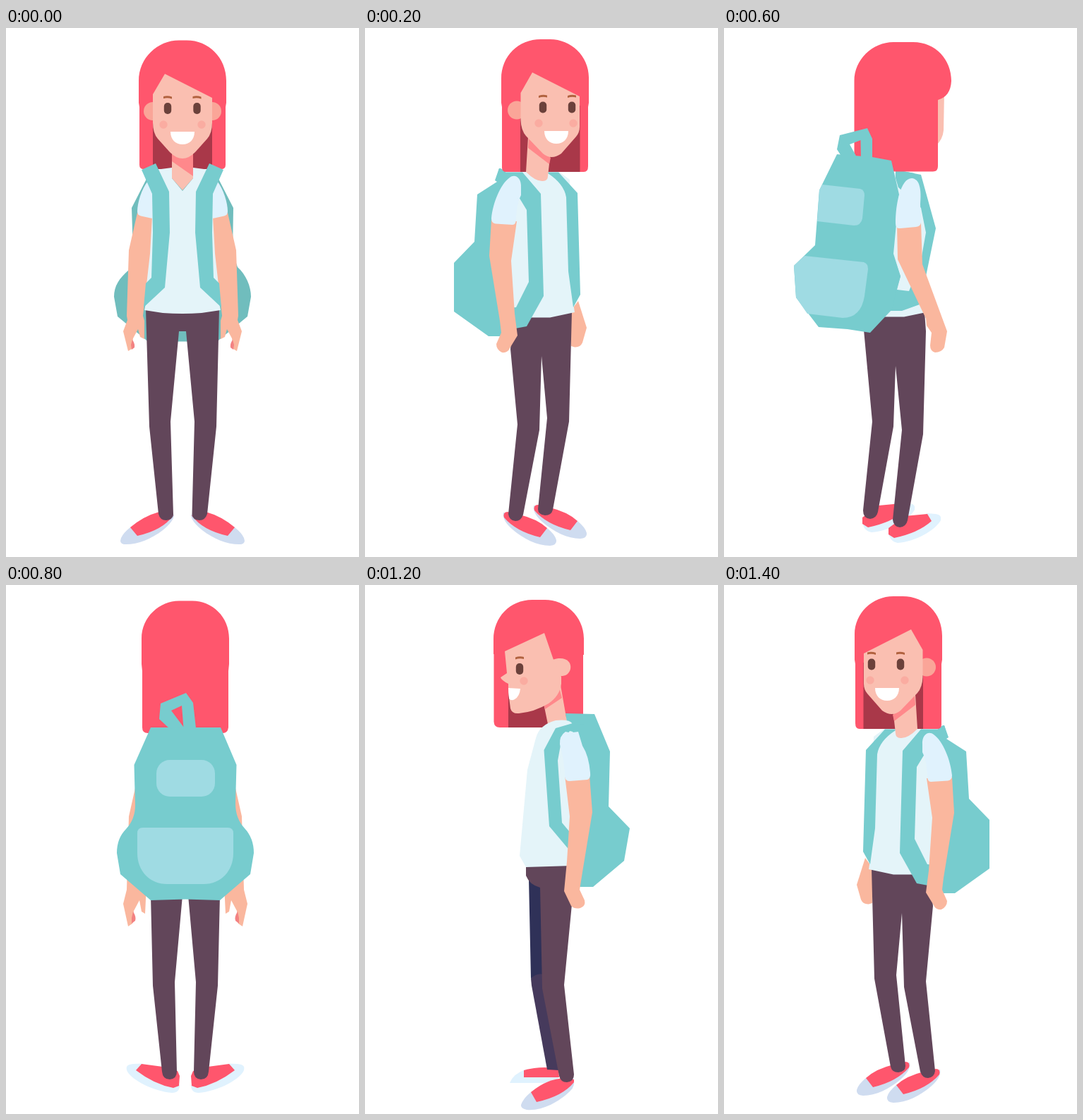
These frames come from a looping animation (500 px wide and 750 px high, 1.6 s). An HTML page with a canvas:

```html
<!DOCTYPE html>
<html lang="en">
<head>
<meta charset="utf-8">
<title>Turnaround</title>
<style>
html, body { margin: 0; width: 100%; height: 100%; overflow: hidden; background: #fff; }
canvas { display: block; }
</style>
</head>
<body>
<canvas id="stage" width="500" height="750"></canvas>
<script>
const ctx = document.getElementById('stage').getContext('2d');
const STEP = 200;

const HAIR = '#ff566d', HAIR_DARK = '#a93849', FACE = '#fabfb1', EAR = '#faa598', NECK_SHADE = '#ff888b';
const SKIN = '#fab79e', CHEEK = '#faaca1', EYE = '#6b413b', BROW = '#b1623f';
const TEAL = '#77ccce', TEAL_DARK = '#70bdbd', POCKET = '#9fdbe3';
const SHIRT = '#e4f4f9', SLEEVE = '#e0f2fd', PANTS = '#62465a', SOLE = '#cfdcf0', SOLE_LIGHT = '#e0f2fe';

function fill(color, d) {
  ctx.fillStyle = color;
  ctx.fill(new Path2D(d));
}

function disc(color, x, y, r) {
  ctx.fillStyle = color;
  ctx.beginPath();
  ctx.arc(x, y, r, 0, Math.PI * 2);
  ctx.fill();
}

function pill(color, x, y, w, h, r) {
  ctx.fillStyle = color;
  ctx.beginPath();
  ctx.roundRect(x, y, w, h, r);
  ctx.fill();
}

function at(x, y, draw) {
  ctx.save();
  ctx.translate(x, y);
  draw();
  ctx.restore();
}

// Reflects x to sum - x.
function flip(sum, dy, draw) {
  ctx.save();
  ctx.translate(sum, dy);
  ctx.scale(-1, 1);
  draw();
  ctx.restore();
}

function both(sum, draw) {
  draw();
  flip(sum, 0, draw);
}

function eye(x, y) {
  pill(EYE, x - 5.2, y - 8, 10.4, 16, 5);
  at(x, y - 16, () => fill(BROW, 'M-6 -1 Q0 -2.5 6 -.5 V2.5 Q0 .5 -6 2Z'));
}

function smile(x, y) {
  at(x, y, () => fill('#fff', 'M-17 0 H17 C17 11 10 18 0 18 S-17 11 -17 0Z'));
}

function front() {
  fill(TEAL_DARK, 'M225 200 L200 212 L178 255 L180 318 L174 343 C160 355 153 366 153 381 L158 409 L201 444.5 H299 L342 409 L347 381 C347 366 340 350 328 339 L321 318 L322 255 L300 212 L275 200Z');
  fill(HAIR, 'M188 75 C188 42 215 17.5 245 17.5 H256 C287 17.5 312 42 312 75 V106 L311 112 V194 Q311 200 305 200 H195 Q189 200 189 194 V112 L188 106Z');
  fill(HAIR_DARK, 'M208 120 H292 V200 H208Z');
  both(500, () => {
    fill(SOLE, 'M238 690 Q238 699 222 712 C205 725 185 733 167 732 Q160 731 163 723 Q166 716 176 708Z');
    fill(HAIR, 'M176 708 Q195 692 217 686 L237 691 Q222 712 186 720Z');
  });
  fill(PANTS, 'M198 398 H302 L298 565 L285 689 Q282 698 274 698 Q264 697 263.5 690 L267 558 L255 430 H245 L233 558 L237 690 Q236 697 227 698 Q218 698 216 689 L203 565Z');
  fill(SHIRT, 'M212 201 L235 198 V213 L250 231 L265 213 V198 L288 201 L302 230 V390 L304 400 L277 404 Q250 406 222 404 L196 400 L198 390 V230Z');
  fill(FACE, 'M235 170 H265 V213 L250 230 L235 213Z');
  fill(NECK_SHADE, 'M235 176 H265 V210 L235 189Z');
  both(500, () => {
    fill(SKIN, 'M186 262 L174 315 L171 408 L172 414 L166 430 L173 458 L178 455 L180 440 L187 427 L190 438 L196 441 L196 415 L194 408 L204 320 L207 268Z');
    fill('#f38282', 'M179 442 Q183 448 182 453 L178 456 L177 449Z');
    fill(SLEEVE, 'M201 217 C192 228 186 248 186 260 Q186 265 191 266.5 L207 270 V220Z');
    fill(TEAL, 'M192 201 L212 192 L231 232 L232 290 L225 368 L195 396 L198 362 L206 354 L208 290 L207 235Z');
    disc(EAR, 208, 118, 13);
  });
  fill(FACE, 'M208 94 L225 65 L292 99 V134 Q292 149 285 157 L268 176 Q250 194 232 176 L215 157 Q208 149 208 134Z');
  eye(229, 114);
  eye(270.5, 114);
  disc(CHEEK, 223, 137, 5.7);
  disc(CHEEK, 277, 137, 5.7);
  smile(250, 147);
}

function shoeFront() {
  fill(SOLE, 'M263 677 Q265 688 250 701 C235 714 215 724 197 724 Q187 723 188 716 Q190 708 201 699Z');
  fill(HAIR, 'M201 699 Q215 686 240 680 L257 676 Q264 676 262 684 Q245 704 211 712Z');
}

function frontTurned() {
  fill(TEAL, 'M300 205 L310 199 H312 L318 216 L315 218 L343 236 L347 303 L376 333 V402 L327 437 H305 L285 400Z');
  fill(HAIR, 'M185 70 C185 40 210 16 240 16 H253 C285 16 309 40 309 72 V106 L308 112 V198 Q308 204 302 204 H192 Q186 204 186 196 V112 L185 106Z');
  fill(HAIR_DARK, 'M197.5 110 H282 V204 H197.5Z');
  shoeFront();
  at(43, 10, shoeFront);
  fill(SKIN, 'M200 387 L188 425 L194 446 Q197 453 205 452.5 L210 451 L212 403Z');
  fill(PANTS, 'M209 402 L213 558 L236 683 Q238 691 247 691 Q257 690 257 682 L244 553 L252 465 L255 570 L278 690 Q281 699 289 699 Q298 698 299 689 L286 562 L296 455 L290 405Z');
  fill(SHIRT, 'M227 204 H303 L300 400 L285 408 L267 410.5 H240 L205 403 L207 390 L212 215Z');
  fill(TEAL, 'M228 204.5 L201 234 L197 378 L207 396 L214 345 L217 240 Q220 221 243 206 V204.5Z');
  fill(FACE, 'M239 175 L271 155 L274 204 Q260 218 250 217 Q243 217 243 210Z');
  fill(NECK_SHADE, 'M239 184 L270 155 L271 170 L241 193Z');
  fill(TEAL, 'M279 204.5 L253 235 L249 380 L273 423 L300 428 V397 L288 396 L270 360 L273 258 L290 230 L317 216 L312 199 L305 204.5Z');
  fill(SKIN, 'M287 274 L323 272 L326 323 L311 415 L309 432 L316 448 Q316 456 308 460 Q300 461 297 454 L286 436 L290 405 L295 330Z');
  fill(SLEEVE, 'M281 226 C280 212 290 206 297 212 C310 221 321 248 323 270 Q323 277 317 277.5 L293 279 Q288 279 288 270 Q287 248 281 237Z');
  disc(EAR, 287, 116.5, 13);
  fill(FACE, 'M198 97 L265 63 L281.5 92 V130 Q281 145 274 153 L250 178 Q238 188 224 178 L203 154 Q198 148 198 140Z');
  eye(209, 112.5);
  eye(250, 112.5);
  disc(CHEEK, 207, 135, 5.7);
  disc(CHEEK, 256, 135, 5.7);
  smile(231, 146);
}

function side() {
  fill(SOLE_LIGHT, 'M278 685 Q295 691 300 704 H236 L230 695Z');
  fill(HAIR, 'M231 684 Q255 679 280 686 V696 H230Z');
  fill('#463a5c', 'M254 549 Q263 546 270 556 L269 566 L247 685 L230 686Z');
  fill('#2f3158', 'M256 424 L273 414 L270 556 Q262 548 253 550Z');
  fill(SOLE, 'M210 697 Q206 708 215 716 C232 732 255 744 276 742 Q285 740 284 735 Q281 726 270 717Z');
  fill(HAIR, 'M209 699 Q240 692 270 717 L262 731 Q225 723 209 703Z');
  fill(PANTS, 'M212 394 H277 V410 Q272 423 257 427 L254 570 L230 694 Q228 703 219 703 Q209 702 209 692 L223 565 L210 430Z');
  fill(HAIR, 'M195 74 C195 42 222 19 250 19 H268 C300 19 323 44 323 75 V96 H322.5 V192 Q322 200 314 200 H250 L235 185 H196 V97 H195Z');
  fill(HAIR_DARK, 'M235 140 H302 V200 H240Z');
  fill(FACE, 'M228 140 L252 166 L245 200 L218 197Z');
  fill(NECK_SHADE, 'M230 143 L226 158 L250 174 L252 167Z');
  fill(TEAL, 'M180 181 L221 180 L217 205 L215 380 L210 426 H182 L138 389 L130 343 L160 312 L158 234Z');
  fill(SHIRT, 'M211 195 Q215 188 235 190 Q258 196 263 215 L275 260 L286 382 L277 398 L212 396 L205 380Z');
  fill(TEAL, 'M190 196 L211 194 L235 201 L251.5 232 L244 340 L218 371 L210 375 L216 347 L226 335 L232 247 L228 225 L215 205 L202 208 L190 230Z');
  fill(SKIN, 'M187 268 H222 L215 326 L219 390 L223 432 L213 453 Q208 458 200 456 Q192 453 194 445 L201 430 L197 405 L183 320Z');
  fill(SLEEVE, 'M203 206 Q215 208 221 206 Q230 212 229 224 Q222 250 222 270 Q221 276 215 276 L190 274 Q185 272 186 264 Q188 240 197 226Z');
  fill(FACE, 'M240 104 C222 98 212 106 214 117 C217 128 226 128 236 126Z');
  fill(FACE, 'M251 66 L307 92 L304 123 L313 129 Q312 133 302 138 V150 L299 173 Q297 181 287 180 Q265 178 245 166 Q229 155 227 138 V128 L238 104Z');
  eye(286, 117);
  disc(CHEEK, 280, 134, 5.7);
  fill('#fff', 'M285 145 L302 144 L301 159 Q298 163 293 160 Q286 156 285 145Z');
}

function shoeBack() {
  fill(SOLE_LIGHT, 'M233 714 Q234 728 246 730 C272 728 299 712 307 698 Q309 690 300 689 L288 688Z');
  fill(HAIR, 'M233 709 L256 692 L288 689 L294 699 Q275 716 241 723 L233 718Z');
}

function backTurned() {
  fill(FACE, 'M300 90 H312 L311 145 Q310 158 300 167Z');
  at(-37, -15, shoeBack);
  shoeBack();
  fill(PANTS, 'M198 428 L210 558 L197 684 Q197 695 207 696 Q216 695 218 686 L240 565 L243 479 L252 570 L239 697 Q240 707 249 708 Q258 707 260 698 L282 576 L286 430 L284 402 H225Z');
  fill(SHIRT, 'M240 203 L275 240 L277 392 L284 403.5 L255 409.5 H225Z');
  fill(TEAL, 'M243 201 L279 208 L300 284 L287 347 L277 392 L252 401 H236 L242 320Z');
  fill(SHIRT, 'M240 203 L247 226 L279 255 L286 290 L278 335 L262 373 L245 371 L250 352 L239 320Z');
  fill(TEAL, 'M243 201 L270 206 L255 226 H247Z');
  fill(HAIR, 'M184.5 75 C184.5 45 210 20 240 20 H268 C300 20 322 45 322 75 Q321 97 303 102 V196 Q303 203.5 296 203.5 H184.5Z');
  fill(TEAL, 'M160 179 L210 183 L237 188 L248 236 L240 320 L250 352 L244 372 L238 399 L207 432 L175 427 L134 424 L102 382 L99 337 L129 308 L135 230Z');
  fill(TEAL, 'M160 172 L164 152 L203 142 L210 157 V185 H194 L193.5 159 L178 165 L188 183 H167Z');
  fill(POCKET, 'M139 222 L193 228 Q199 230 199 237 L196 270 Q194 280 184 280 L132 274 L135 230Z');
  fill(POCKET, 'M114 323 L198 332 Q204 334 204 342 L199 380 Q194 411 168 411 L118 405 L102 382 L99 337Z');
  fill(SKIN, 'M245 278 L279 276 L281 335 L316 430 L312 453 Q308 460 299 460 Q292 458 292 450 L294 432 L287 422 L286 412 L246 328Z');
  fill(SLEEVE, 'M243 277 C243 250 250 213 266 213 C277 214 280 228 278 250 L279 275 Q279 281 272 282 L250 284 Q243 285 243 277Z');
}

function back() {
  both(508, () => {
    fill(SKIN, 'M183 288 L174 328 L171 432 L166 452 L173 484 L179 480 L181 462 L189 447 L192 463 L197 466 L199 425 L195 300Z');
    fill('#f38282', 'M180 463 Q185 471 183 476 L178 480 L178 472Z');
    fill(SOLE_LIGHT, 'M246 709 Q246 720 235 720 C210 718 180 703 172 690 Q167 680 180 679 L192 678.5Z');
    fill(HAIR, 'M192 679 L222 683 L243 689 L246 696 L245 710 L237 713 Q210 708 184 688Z');
    fill(PANTS, 'M205 440 L208 568 L221 690 Q222 701 232 701 Q242 700 242 690 L239 563 L250 440Z');
  });
  fill(HAIR, 'M192 76 C192 45 218 22.5 245 22.5 H264 C292 22.5 316 45 316 76 V112 L315 122 V202 Q314 210 307 210 H201 Q193 210 193 202 V122 L192 112Z');
  fill(TEAL, 'M205 202 H304 L326.5 255 L325 310 Q325 331 338 345 Q351 359 351 380 L346 410 L303 447 L254 445.5 L205 447 L162 410 L157 380 Q157 359 170 346 Q183 332 183 312 L181.5 255Z');
  fill(TEAL, 'M217 190 L219 168 L255 153 L265 167 L269 203 H251.5 L249 171 L234 178 L252 202 L232 204Z');
  pill(POCKET, 213, 248, 83, 52, 19);
  fill(POCKET, 'M194 344 H314 Q322 344 322 352 V380 C322 406 304 424 280 424 H228 C204 424 186 406 186 380 V352 Q186 344 194 344Z');
}

const poses = [
  front,
  () => flip(502, 0, frontTurned),
  side,
  backTurned,
  back,
  () => flip(498, 4, backTurned),
  () => flip(505, 2, side),
  frontTurned
];

let shown = -1;
const start = performance.now();

function tick() {
  const i = Math.floor((performance.now() - start) / STEP) % poses.length;
  if (i !== shown) {
    shown = i;
    ctx.fillStyle = '#fff';
    ctx.fillRect(0, 0, 500, 750);
    poses[i]();
  }
  requestAnimationFrame(tick);
}
tick();
</script>
</body>
</html>
```
